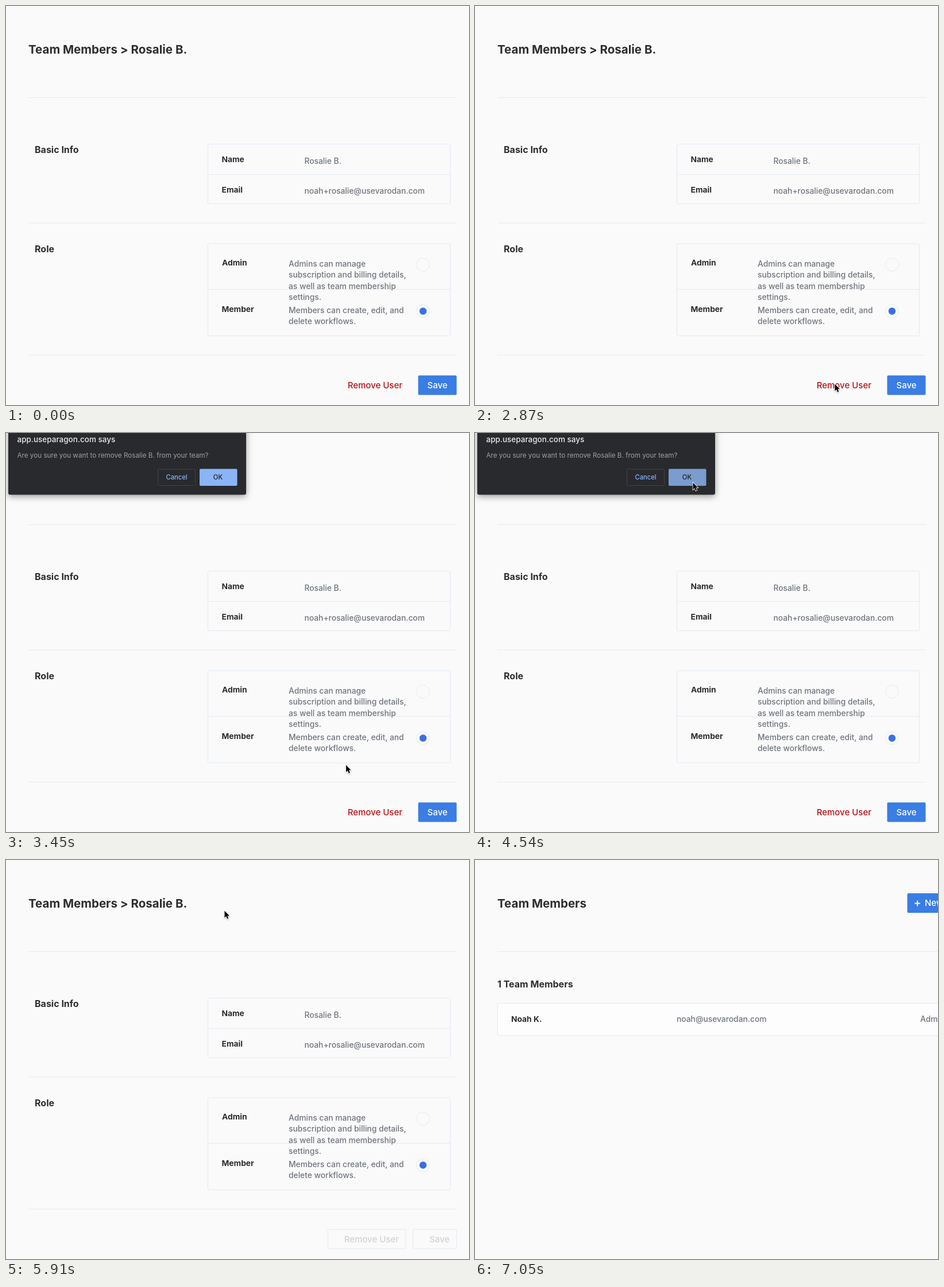
Recreate the animation shown at these times as an HTML page. Size 806 by 695 pixels, loop 8.57 s.

```html
<!DOCTYPE html>
<html lang="en">
<head>
<meta charset="utf-8">
<title>Remove a team member</title>
<style>
  html, body { margin: 0; height: 100%; overflow: hidden; background: #fafafa; }
  svg { display: block; width: 806px; height: 695px; font: 500 13.8px Inter, sans-serif; font-optical-sizing: none; }
  text { fill: #70757f; }
  .h1, .h2, .label { font-weight: 700; fill: #2d2d30; }
  .h1 { font-size: 20.5px; }
  .h2 { font-size: 16px; }
  .label { font-size: 13.8px; }
  .btn { font-size: 15px; }
  .blue { fill: #3a7de4; }
  .white { fill: #fff; }
  .red { fill: #b7131a; }
  .box { fill: none; stroke: #e0e9f7; }
  .line { fill: none; stroke: #e6eaf1; }
  .ring { fill: none; stroke: #e6eaf0; }
  .off text { fill: #d0d2d7; }
  .says { font-size: 13.5px; fill: #e8eaed; }
  .ask { font-size: 11.7px; font-weight: 400; fill: #9aa0a6; }
  .small { font-size: 11.2px; text-anchor: middle; }
</style>
</head>
<body>
<svg viewBox="0 0 806 695">
  <g id="member">
    <text class="h1" x="39" y="83">Team Members &gt; Rosalie B.</text>
    <path class="line" d="M39 159.5H785M39 378H785M39 608H785"/>

    <text class="h2" x="50" y="256">Basic Info</text>
    <rect class="box" x="351.5" y="240.5" width="422" height="104" rx="2"/>
    <path class="line" d="M352 293.5H773"/>
    <text class="label" x="375.5" y="272">Name</text>
    <text x="519.5" y="274.5">Rosalie B.</text>
    <text class="label" x="375.5" y="324.5">Email</text>
    <text x="519.5" y="327">noah+rosalie@usevarodan.com</text>

    <text class="h2" x="50" y="429">Role</text>
    <rect class="box" x="351.5" y="414" width="422" height="160.5" rx="2"/>
    <path class="line" d="M352 493.5H773"/>
    <text class="label" x="376" y="451.5">Admin</text>
    <text y="454">
      <tspan x="492">Admins can manage</tspan>
      <tspan x="492" dy="19.3">subscription and billing details,</tspan>
      <tspan x="492" dy="19.3">as well as team membership</tspan>
      <tspan x="492" dy="19.3">settings.</tspan>
    </text>
    <text class="label" x="375.5" y="532.5">Member</text>
    <text y="535">
      <tspan x="492">Members can create, edit, and</tspan>
      <tspan x="492" dy="19.3">delete workflows.</tspan>
    </text>
    <circle class="ring" cx="726" cy="450.5" r="11.5"/>
    <circle class="ring" cx="726" cy="531.5" r="11.5"/>
    <circle cx="726" cy="531.5" r="6.2" fill="#3a6fe0"/>

    <g id="active" class="btn">
      <text class="red" x="594.7" y="665.5">Remove User</text>
      <rect class="blue" x="717.5" y="643.5" width="67" height="34" rx="2"/>
      <text class="white" x="733.5" y="665.5">Save</text>
    </g>
    <g id="disabled" class="btn off">
      <rect class="box" x="560.5" y="643.5" width="135.5" height="33.5" rx="1"/>
      <text x="588.7" y="665.5">Remove User</text>
      <rect class="box" x="708.5" y="643.5" width="76" height="33.5" rx="1"/>
      <text x="737" y="665.5">Save</text>
    </g>
  </g>

  <g id="list">
    <text class="h1" x="39" y="83">Team Members</text>
    <rect class="blue" x="752.5" y="58" width="60" height="34" rx="2"/>
    <path d="M765.5 75.5H775M770.2 70.7V80.2" stroke="#fff" stroke-width="1.8"/>
    <text class="btn white" x="783" y="80">New</text>
    <path class="line" d="M39 159.5H806"/>
    <text class="h2" x="39" y="222">1 Team Members</text>
    <rect x="39.5" y="249.5" width="800" height="56.5" rx="2" fill="#fdfdfd" stroke="#e3e7f4"/>
    <text class="label" x="63" y="282">Noah K.</text>
    <text x="351" y="282">noah@usevarodan.com</text>
    <text x="775" y="282">Admin</text>
  </g>

  <g id="dialog">
    <rect x="4" y="-12" width="414" height="119.5" rx="3" fill="#292a2d" style="filter:drop-shadow(0 3px 6px #0006)"/>
    <text class="says" x="19.5" y="16">app.useparagon.com says</text>
    <text class="ask" x="19.5" y="43">Are you sure you want to remove Rosalie B. from your team?</text>
    <rect x="264.5" y="63" width="65" height="28.5" rx="2" fill="none" stroke="#414347"/>
    <text class="small" x="297" y="81" style="fill:#8ab4f8">Cancel</text>
    <rect id="ok" x="337" y="62.5" width="65.5" height="29.5" rx="2"/>
    <text class="small" x="369" y="81" style="fill:#202124">OK</text>
  </g>

  <path id="cursor" d="M.5.5V12.6L3.2 10 5.2 14.6 7.3 13.7 5.4 9.2H9Z" stroke="#fff" stroke-width="1.6"
    paint-order="stroke" style="filter:drop-shadow(0 1px 1px #0004)"/>
</svg>
<script>
  const LOOP = 8570, ASK = 2930, CONFIRM = 5260, LIST = 5960, ENTER = 710, LEAVE = 7050;

  const easeIn = p => u => u ** p;
  const easeOut = p => u => 1 - (1 - u) ** p;
  const glide = u => (u + u * u * (3 - 2 * u)) / 2;

  // Each move starts where the previous one ended; x and y may ease differently.
  const moves = [
    { from: ENTER, to: 1520, x: 590, y: 596, easeX: easeOut(2.25), easeY: easeOut(1.45) },
    { from: 1570, to: 2450, x: 626, y: 658, easeX: easeOut(3), easeY: easeOut(3) },
    { from: 3200, to: 4540, x: 379, y: 86, easeX: glide, easeY: glide },
    { from: CONFIRM, to: 5430, x: 380, y: 88, easeX: glide, easeY: glide },
    { from: 6350, to: LEAVE, x: 464, y: 698, easeX: easeIn(5), easeY: easeIn(1.4) }
  ];

  const el = id => document.getElementById(id);
  const show = (id, on) => { el(id).style.display = on ? '' : 'none'; };
  const progress = (t, from, to) => Math.min(1, Math.max(0, (t - from) / (to - from)));

  function pointerAt(t) {
    let x = 33, y = 307;
    for (const m of moves) {
      const u = progress(t, m.from, m.to);
      x += (m.x - x) * m.easeX(u);
      y += (m.y - y) * m.easeY(u);
    }
    return [x, y];
  }

  function draw() {
    const t = (performance.now() - start) % LOOP;
    const fade = progress(t, CONFIRM, 5430);
    const [x, y] = pointerAt(t);
    const hover = x > 337 && x < 403 && y < 92;

    show('member', t < LIST);
    show('list', t >= LIST);
    show('dialog', t >= ASK && t < CONFIRM);
    show('cursor', t >= ENTER && t < LEAVE);
    el('active').style.opacity = 1 - fade;
    el('disabled').style.opacity = fade;
    el('ok').setAttribute('fill', hover ? '#7a9ccf' : '#8ab4f8');
    el('cursor').setAttribute('transform', `translate(${x} ${y})`);
    requestAnimationFrame(draw);
  }

  const start = performance.now();
  draw();
</script>
</body>
</html>
```
